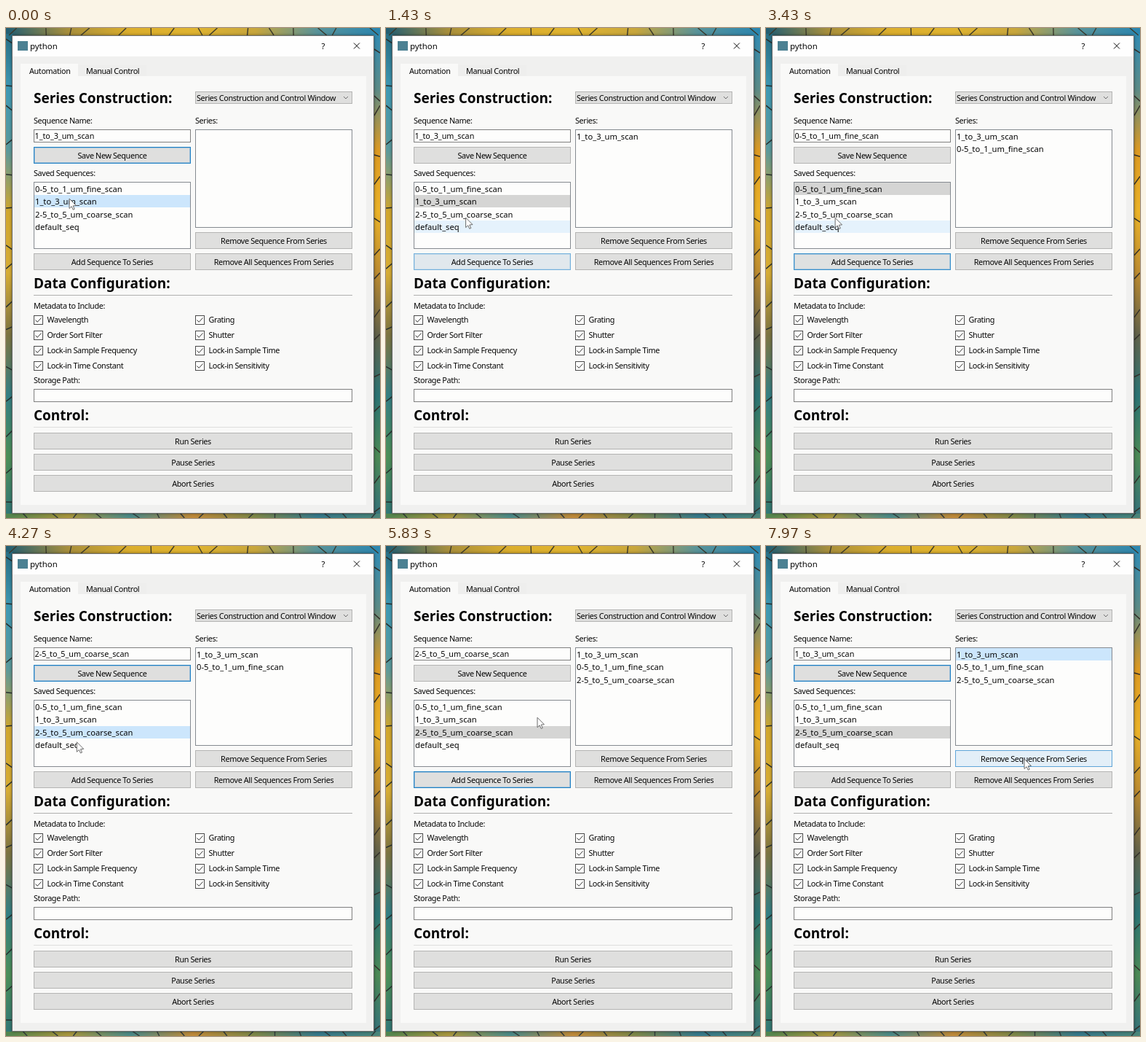
An HTML page with a canvas for the animation above (8 s loop, 514 by 672 pixels).

```html
<!DOCTYPE html>
<html lang="en">
<head>
<meta charset="utf-8">
<title>Series control</title>
<style>
  html, body { margin: 0; width: 100%; height: 100%; overflow: hidden; }
  canvas { display: block; width: 514px; height: 672px; }
</style>
</head>
<body>
<canvas id="stage" width="514" height="672"></canvas>
<script>
const ctx = document.getElementById('stage').getContext('2d');
const LOOP = 8000, ROW = 17.3, LAG = 40, FADE = 250;
const INK = '#060606', FIELD = '#fdfdfc', PANE = '#f9f9f8';
const FILL = '#dfdfde', EDGE = '#b4b4b3', BLUE = '#1f80c4';
const FONT = '"Noto Sans", "Open Sans", sans-serif';
const SAVED = ['0-5_to_1_um_fine_scan', '1_to_3_um_scan', '2-5_to_5_um_coarse_scan', 'default_seq'];

// Pointer stops: time, x, y
const PATH = [
  [0, 87, 234], [300, 87, 234], [680, 114, 321], [1220, 114, 321],
  [1580, 107, 224], [2280, 107, 224], [2660, 110, 321], [3060, 110, 321],
  [3450, 95, 260], [4180, 95, 260], [4560, 111, 321], [5400, 111, 321],
  [6250, 301, 153], [7100, 301, 153], [7600, 355, 292], [8000, 355, 292]
];

// Each click changes part of the form
const EVENTS = [
  [0, { focus: 'saved', picked: 1, name: 1, series: [], chosen: -1 }],
  [920, { focus: 'add', series: [1] }],
  [1870, { focus: 'saved', picked: 0, name: 0 }],
  [2830, { focus: 'add', series: [1, 0] }],
  [3800, { focus: 'saved', picked: 2, name: 2 }],
  [4780, { focus: 'add', series: [1, 0, 2] }],
  [6760, { focus: 'series', chosen: 0, name: 1 }]
];

function stateAt(t) {
  return Object.assign({}, ...EVENTS.filter(e => e[0] <= t).map(e => e[1]));
}

function pointerAt(time) {
  const t = Math.max(0, time);
  let i = 0;
  while (i < PATH.length - 2 && PATH[i + 1][0] <= t) i++;
  const [t0, x0, y0] = PATH[i], [t1, x1, y1] = PATH[i + 1];
  const u = (t - t0) / (t1 - t0), k = u * u * (3 - 2 * u);
  return { x: x0 + (x1 - x0) * k, y: y0 + (y1 - y0) * k };
}

const inside = (p, x, y, w, h) => p.x >= x && p.x < x + w && p.y >= y && p.y < y + h;

// Share of the recent past spent over a box, so hover colours fade in and out
function hoverAt(t, x, y, w, h) {
  const steps = 10;
  let hits = 0;
  for (let i = 0; i < steps; i++) {
    if (inside(pointerAt(t - LAG - i * FADE / steps), x, y, w, h)) hits++;
  }
  return hits / steps;
}

function rect(x, y, w, h, color) {
  ctx.fillStyle = color;
  ctx.fillRect(x, y, w, h);
}

function outline(x, y, w, h, color) {
  ctx.strokeStyle = color;
  ctx.lineWidth = 1;
  ctx.strokeRect(x + 0.5, y + 0.5, w - 1, h - 1);
}

function box(x, y, w, h, fill, edge) {
  rect(x, y, w, h, fill);
  outline(x, y, w, h, edge);
}

function line(color, width, ...pts) {
  ctx.strokeStyle = color;
  ctx.lineWidth = width;
  ctx.beginPath();
  for (let i = 0; i < pts.length; i += 2) ctx.lineTo(pts[i], pts[i + 1]);
  ctx.stroke();
}

function text(s, x, y, size = 10.8, spacing = 0, weight = 400, align = 'left') {
  ctx.font = `${weight} ${size}px ${FONT}`;
  ctx.letterSpacing = spacing + 'px';
  ctx.textAlign = align;
  ctx.fillStyle = INK;
  ctx.fillText(s, x, y);
}

const label = (s, x, mid) => text(s, x, mid + 4, 10.8, -0.36);
const heading = (s, baseline) => text(s, 38, baseline, 19, 0, 700);

function button(s, x, y, w, t, isDefault) {
  const over = hoverAt(t, x, y, w, 23);
  box(x, y, w, 23, FILL, isDefault ? BLUE : EDGE);
  if (isDefault) outline(x + 1, y + 1, w - 2, 21, '#9fc0d8');
  ctx.globalAlpha = over;
  box(x, y, w, 23, '#e3eff8', '#5fa5d8');
  ctx.globalAlpha = 1;
  text(s, x + w / 2, y + 15.5, 10.8, -0.36, 400, 'center');
}

function list(items, x, y, h, selected, focused, t) {
  const p = pointerAt(t - LAG);
  box(x, y, 216, h, FIELD, '#858a90');
  items.forEach((s, i) => {
    const top = y + 0.5 + i * ROW;
    const over = inside(p, x, top, 216, ROW);
    let color = null;
    if (i === selected) color = focused ? '#cce6fc' : '#d5d5d4';
    else if (over) color = '#e5f2fc';
    if (color) rect(x + 1, Math.round(top + 0.5), 214, 17, color);
    text(s, x + 2, top + 13.6, 11.2);
  });
}

function check(s, x, mid) {
  box(x, mid - 6, 13, 13, FIELD, '#4a4a4a');
  line('#333333', 1, x + 2.5, mid + 0.5, x + 5.2, mid + 3.3, x + 10.5, mid - 2.5);
  label(s, x + 18.5, mid);
}

function strip(x, y, w, h, colors) {
  const g = ctx.createLinearGradient(0, 0, w > h ? 514 : 0, w > h ? 0 : 672);
  colors.forEach((c, i) => g.addColorStop(i / (colors.length - 1), c));
  rect(x, y, w, h, g);
}

function wallpaper() {
  strip(0, 0, 514, 12, ['#1f5d74', '#a88f3c', '#dcae2c', '#e0b430', '#c8a63c', '#58939a', '#2a86b0']);
  strip(0, 664, 514, 8, ['#4f8550', '#a8963c', '#4a8a88', '#c08a38', '#7d8748', '#35788a', '#4a8578']);
  strip(0, 8, 9, 658, ['#256a80', '#409ab4', '#5b9a9c', '#d2a72c', '#d8ad34', '#7d7440', '#347f84', '#4d9058', '#2f7678']);
  strip(506, 8, 8, 658, ['#2d8cb8', '#5c8c88', '#dd9a22', '#ecb328', '#bd8c30', '#62624a', '#2b7474', '#4c8a56', '#33717c']);
  let seed = 17;
  const rnd = () => (seed = seed * 16807 % 2147483647) / 2147483647;
  for (let i = 0; i < 15; i++) {
    const y = 15 + i * 44 + rnd() * 25, x = 10 + i * 34 + rnd() * 20;
    line('#26302f', 1.5, 0, y, 9, y + rnd() * 18 - 9);
    line('#33302a', 1.5, 506, y + 14, 514, y + rnd() * 24);
    line('#3c3a2c', 1.4, x, 0, x + rnd() * 24 - 12, 10);
    line('#30393a', 1.4, x + 8, 665, x + rnd() * 20, 672);
  }
}

function windowFrame() {
  ctx.save();
  ctx.shadowColor = 'rgba(0, 0, 0, .45)';
  ctx.shadowBlur = 4;
  rect(8, 10, 498, 656, '#707070');
  ctx.restore();
  rect(9, 11, 496, 654, '#f0f0ef');
  rect(9, 11, 496, 28, '#fefefe');
  rect(16, 18, 14, 13, '#4c8193');
  text('python', 33, 29, 11.4);
  text('?', 436, 29, 11.4, 0, 400, 'center');
  line(INK, 1, 478, 20.5, 486, 28.5);
  line(INK, 1, 486, 20.5, 478, 28.5);

  rect(20, 66, 475, 588, PANE);
  rect(99, 51, 94, 15, '#eeeeed');
  rect(20, 49, 79, 18, PANE);
  label('Automation', 32, 58.5);
  label('Manual Control', 110, 59);
}

function form(s, t) {
  heading('Series Construction:', 103);
  box(260, 87, 216, 17, FILL, EDGE);
  label('Series Construction and Control Window', 262, 96);
  line('#707070', 1, 464, 94, 467, 97, 470, 94);

  label('Sequence Name:', 38, 127);
  label('Series:', 260, 127);
  box(38, 139, 216, 18, FIELD, '#7f7f7f');
  text(SAVED[s.name], 39.5, 152);
  button('Save New Sequence', 38, 163, 216, t, s.focus !== 'add');
  label('Saved Sequences:', 38, 198.5);
  list(SAVED, 38, 211, 92, s.picked, s.focus === 'saved', t);
  list(s.series.map(i => SAVED[i]), 260, 139, 135, s.chosen, s.focus === 'series', t);
  button('Add Sequence To Series', 38, 309, 216, t, s.focus === 'add');
  button('Remove Sequence From Series', 260, 280, 216, t);
  button('Remove All Sequences From Series', 260, 309, 216, t);

  heading('Data Configuration:', 357);
  rect(38, 366, 438, 1, '#b0b0af');
  label('Metadata to Include:', 38, 381);
  [['Wavelength', 'Grating'], ['Order Sort Filter', 'Shutter'],
   ['Lock-in Sample Frequency', 'Lock-in Sample Time'],
   ['Lock-in Time Constant', 'Lock-in Sensitivity']].forEach(([a, b], i) => {
    check(a, 38, 400 + i * 21);
    check(b, 260, 400 + i * 21);
  });
  label('Storage Path:', 38, 483);
  box(38, 495, 438, 18, FIELD, '#7f7f7f');

  heading('Control:', 538);
  rect(38, 547, 438, 1, '#dededd');
  ['Run Series', 'Pause Series', 'Abort Series'].forEach((name, i) =>
    button(name, 38, 555 + i * 29, 438, t));
}

function pointer({ x, y }) {
  ctx.save();
  ctx.translate(x, y);
  ctx.beginPath();
  [[0, 0], [0, 13.5], [3.1, 10.7], [5.2, 15.2], [7.2, 14.3], [5.2, 9.9], [9.4, 9.5]]
    .forEach(q => ctx.lineTo(...q));
  ctx.closePath();
  ctx.fillStyle = '#fdfdfd';
  ctx.fill();
  ctx.strokeStyle = '#5c5c5c';
  ctx.lineWidth = 0.9;
  ctx.stroke();
  ctx.restore();
}

function draw(now) {
  const t = Math.max(0, now) % LOOP;
  wallpaper();
  windowFrame();
  form(stateAt(t), t);
  pointer(pointerAt(t));
}

const start = performance.now();
function tick() {
  draw(performance.now() - start);
  requestAnimationFrame(tick);
}
tick();
</script>
</body>
</html>
```
